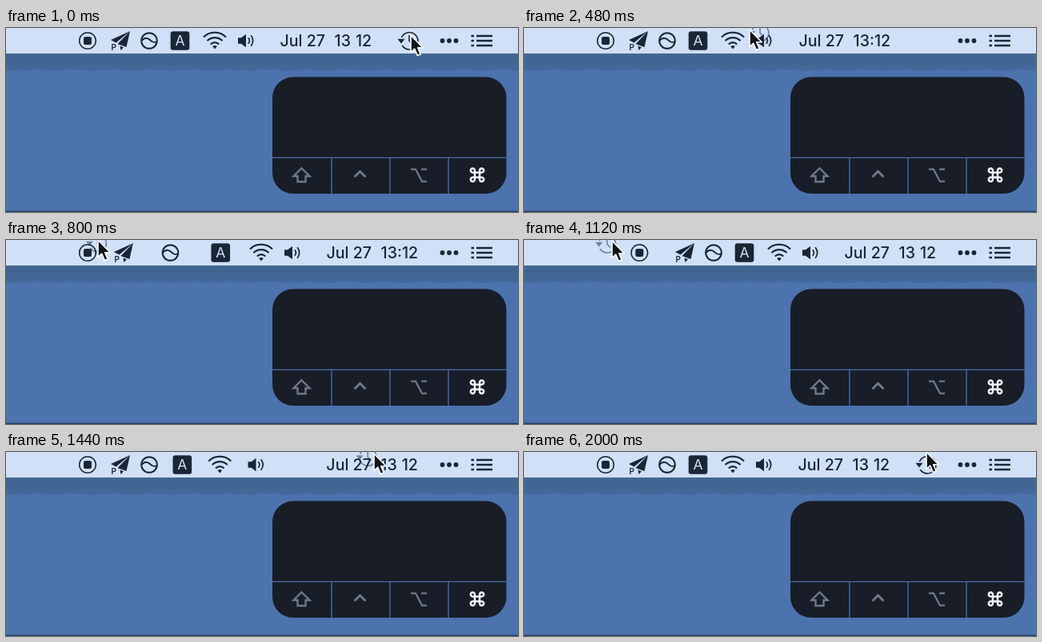
These frames come from a looping animation (640x231 px, 2040 ms). An HTML page:

```html
<!DOCTYPE html>
<html lang="en">
<head>
<meta charset="utf-8">
<title>Rearranging menu bar items</title>
<style>
  html, body { margin: 0; width: 100%; height: 100%; overflow: hidden; background: #4c73ad; }
  svg { display: block; width: 640px; height: 231px; }
  text { font-family: Inter, "Open Sans", sans-serif; }
  .ink { fill: #1a2535; }
  .line { fill: none; stroke: #1a2535; }
  .key { fill: none; stroke: #6f7988; }
  .date { font-size: 19.6px; font-weight: 500; }
</style>
</head>
<body>
<svg viewBox="0 0 640 231">
  <defs>
    <linearGradient id="shade" x2="0" y2="1">
      <stop offset="0" stop-color="#446894"/>
      <stop offset=".3" stop-color="#416490"/>
      <stop offset="1" stop-color="#446a9c"/>
    </linearGradient>
  </defs>
  <rect width="640" height="231" fill="#4c73ad"/>
  <path id="strip" fill="url(#shade)"/>
  <rect y="229.6" width="640" height="1.4" fill="#293f63"/>
  <rect width="640" height="32" fill="#cfe0f7"/>

  <!-- key panel -->
  <rect x="333" y="61.5" width="292.5" height="146.5" rx="26" fill="#181d28"/>
  <path d="M333 162.7H625.5M407 163V208M480 163V208M553 163V208" stroke="#426295" stroke-width="1.6"/>
  <g class="key">
    <path transform="translate(369.5 185)" d="M0-9 10 1H5V8H-5V1H-10Z" stroke-width="2.4"/>
    <path transform="translate(442.5 184)" d="M-7 3 0-4 7 3" stroke-width="3"/>
    <path transform="translate(516 185)" d="M-10-7.6H-4L4 7.6H10M3-7.6H10" stroke-width="2.2"/>
    <path transform="translate(589 184.5)" stroke="#f1f4f9" stroke-width="2.5"
      d="M-3-3H3V3H-3ZM-3-3V-5.5A2.6 2.6 0 1 0-5.6-3ZM3-3V-5.5A2.6 2.6 0 1 1 5.6-3ZM3 3V5.5A2.6 2.6 0 1 0 5.6 3ZM-3 3V5.5A2.6 2.6 0 1 1-5.6 3Z"/>
  </g>

  <!-- menu bar items -->
  <g id="record">
    <circle class="line" r="10.3" stroke-width="1.5"/>
    <rect class="ink" x="-5" y="-5" width="10" height="10" rx="2.2"/>
  </g>
  <g id="plane" class="ink">
    <path d="M12-12-12-1-5.5 2.5ZM12-12-3.5 4 7.5 8ZM-.5 6.5 4 8.2.5 12Z"/>
    <text x="-11.5" y="11.5" font-size="10" font-weight="600">P</text>
  </g>
  <g id="orb" class="line">
    <circle r="9.8" stroke-width="2"/>
    <path d="M-9.5 0C-6-4.5-2-4 1-1S6 3 9.5 1" stroke-width="2"/>
  </g>
  <g id="letter">
    <rect class="ink" x="-11.8" y="-11.8" width="23.6" height="23.6" rx="3"/>
    <text y="6.3" text-anchor="middle" font-size="17.5" fill="#cfe0f7">A</text>
  </g>
  <g id="wifi">
    <path class="line" stroke-width="2.2" d="M-14-4.5A19.8 19.8 0 0 1 14-4.5M-9.5 0A13.4 13.4 0 0 1 9.5 0M-5.2 4.4A7.3 7.3 0 0 1 5.2 4.4"/>
    <path class="ink" d="M-2.8 7Q0 5 2.8 7L0 10.5Z"/>
  </g>
  <g id="speaker">
    <path class="ink" d="M-10-3.8H-6L0-8.2V8.2L-6 3.8H-10Z"/>
    <path class="line" stroke-width="1.7" stroke-linecap="round" d="M3.2-3.2Q5.6 0 3.2 3.2M6.5-6.2Q10.8 0 6.5 6.2"/>
  </g>
  <g id="date" class="ink date">
    <text y="7">Jul 27</text>
    <text x="68" y="7">13<tspan id="colon">:</tspan>12</text>
  </g>
  <g class="ink">
    <circle cx="545.5" cy="16" r="2.9"/><circle cx="554" cy="16" r="2.9"/><circle cx="562.5" cy="16" r="2.9"/>
  </g>
  <path class="line" stroke-width="2.6" d="M581.5 10H585M588 10H608M581.5 16H585M588 16H608M581.5 22H585M588 22H608"/>

  <g id="clock">
    <path class="line" stroke-width="1.6" d="M-9.6-4A10.7 10.7 0 1 1-8.8 6M0-7V0L4 4.5"/>
    <path class="ink" d="M-14.5-2.2H-5.5L-10 3.5Z"/>
  </g>
  <path id="cursor" fill="#10141b" stroke="#fff" stroke-width="1.6" stroke-linejoin="round"
    d="M0 0V21.5L4.8 17.2 8.3 25.6 12.2 24 8.7 15.8H15.2Z"/>
</svg>
<script>
const LOOP = 2040, STEP = 40, GAP = 58;
const $ = id => document.getElementById(id);
const clamp = v => Math.max(0, Math.min(1, v));
const ease = v => { v = clamp(v); return v * v * (3 - 2 * v); };
const place = (id, x, y) => $(id).setAttribute('transform', `translate(${x.toFixed(2)} ${y.toFixed(2)})`);

// id, resting x, time it makes room, time it returns, return duration
const items = [
  ['record', 102, 962, 1153, 240],
  ['plane', 143, 762, 1196, 240],
  ['orb', 179, 687, 1203, 240],
  ['letter', 217.5, 613, 1232, 240],
  ['wifi', 261, 550, 1249, 240],
  ['speaker', 300, 500, 1272, 240],
  ['date', 342.5, 461, 1432, 280]
];

// cursor tip: time, x, y
const path = [
  [0, 506, 9], [280, 500, 8], [360, 470, 6], [440, 372, 3], [480, 282, 2],
  [520, 250, 1], [613, 214, 1], [687, 178, 0], [800, 115, 0], [920, 96, 0],
  [1040, 97, 1], [1120, 110, 1], [1160, 150, 3], [1200, 222, 6], [1240, 318, 9],
  [1280, 379, 10], [1360, 432, 6], [1440, 460, 2], [1600, 493, -1],
  [1760, 502, 0], [2000, 503, 0], [2040, 506, 9]
];

function tip(t) {
  const i = Math.max(1, path.findIndex(p => p[0] >= t));
  const a = path[i - 1], b = path[i], k = clamp((t - a[0]) / (b[0] - a[0]));
  return [a[1] + (b[1] - a[1]) * k, a[2] + (b[2] - a[2]) * k];
}

function draw(t) {
  for (const [id, x, open, close, length] of items) {
    const shift = GAP * ease((t - open) / 240) * (1 - ease((t - close) / length));
    place(id, x + shift, 16);
  }
  $('colon').setAttribute('fill-opacity', t >= 80 && t < 1080 ? 1 : 0);

  const [x, y] = tip(t);
  place('cursor', x, y);

  const dragged = t >= 200 && t < 1760;
  const [gx, gy] = tip(Math.max(0, t - 8));
  place('clock', dragged ? gx - 5 : 504, dragged ? gy + 4 : 16);
  $('clock').setAttribute('opacity', dragged ? 0.5 : 1);
}

// uneven lower edge of the shaded strip
let edge = 'M0 32H640V53';
for (let x = 640; x >= 0; x -= 4) {
  edge += `L${x} ${(53.2 + 0.6 * Math.sin(x * 1.7) + 0.6 * Math.sin(x * 0.31)).toFixed(1)}`;
}
$('strip').setAttribute('d', edge + 'Z');

const start = performance.now();
function tick() {
  const t = (performance.now() - start) % LOOP;
  draw(Math.floor(t / STEP) * STEP);
  requestAnimationFrame(tick);
}
tick();
</script>
</body>
</html>
```
